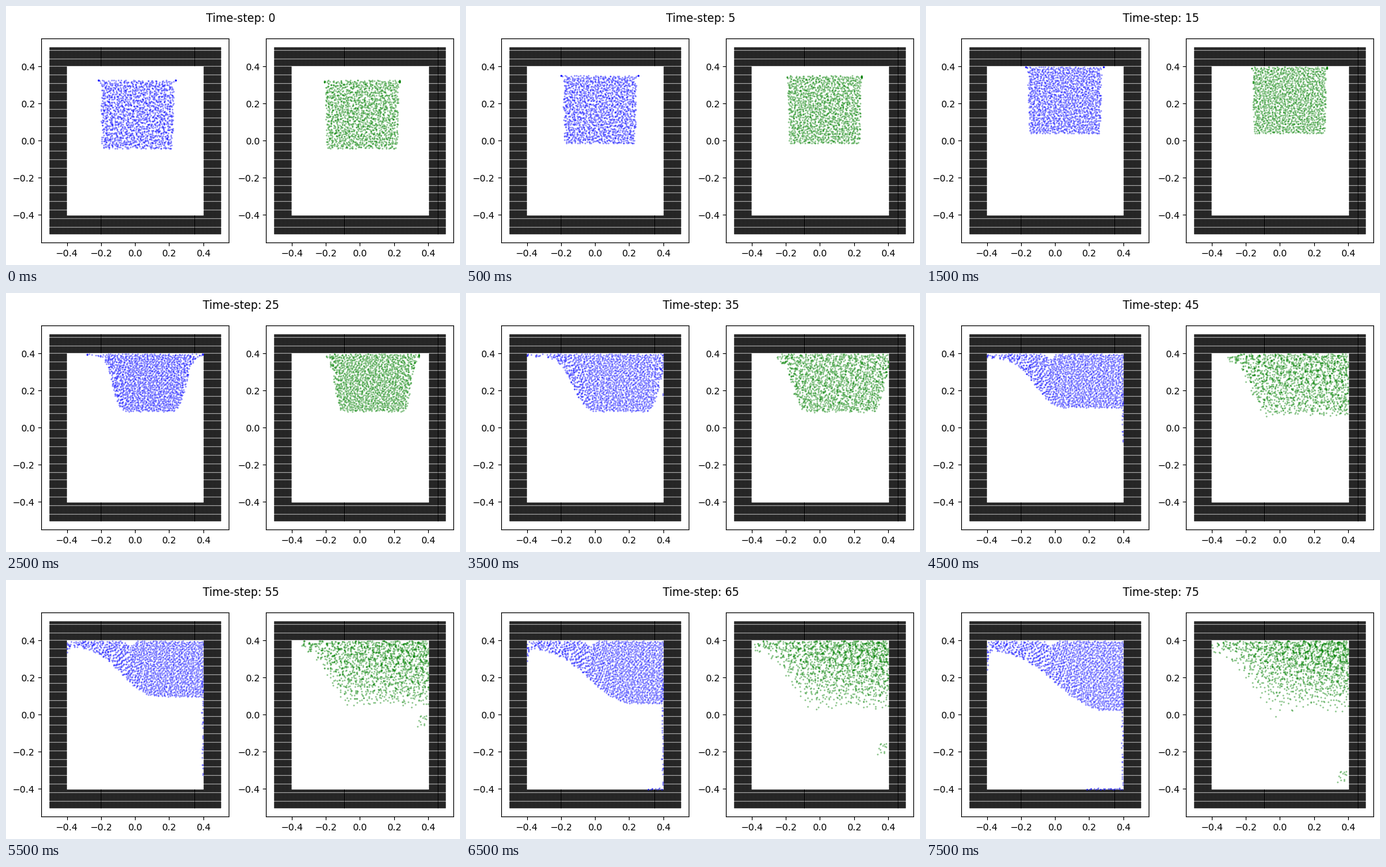
Write a matplotlib script that moves like this. It is 683x391 px and loops after 8 s.

```python
import numpy as np
import matplotlib.pyplot as plt
from matplotlib.animation import FuncAnimation

W, H = 683, 391
STEP, FRAMES = 5, 16
N = 1700

plt.rcParams["font.family"] = "DejaVu Sans"
rng = np.random.default_rng(4)


def since(t, start):
    return max(t - start, 0)


def rise(z):
    return 1 / (1 + np.exp(-np.clip(z, -40, 40)))


class Fluid:
    """A block that drifts up and right, then spreads below the ceiling."""

    def __init__(self, spread, reach, film, jitter):
        self.spread, self.reach, self.film = spread, reach, film
        i = np.arange(1, N + 1)
        self.grid = np.stack([i * .7548776662 % 1, i * .5698402910 % 1])
        self.noise = jitter * rng.normal(size=(2, N))

    def fill(self, t, left, bottom, lift=1, lean=0, dent=0, hang=0):
        soft = .002 + self.spread * since(t, 15)
        soft_r = min(soft, .022)
        right = .224 + .003 * t + .012 * since(t, 31)
        x = np.linspace(max(left - self.reach * soft, -.4),
                        min(right + self.reach * soft_r, .4), 800)
        ceiling = min(.325 + .005 * t, .398)
        top = ceiling - dent * np.exp(-((x + .03) / .025) ** 2)
        depth = (ceiling - bottom) * rise((x - left) / soft) * rise((right - x) / soft_r)
        depth += self.film * since(t, 15) + hang * np.exp(-(x + .4) / .008)
        low = np.minimum(np.maximum(ceiling - depth, bottom), top)

        # Columns take particles in proportion to their height
        u, v = np.clip(self.grid + self.noise * (.3 + .7 * np.exp(-t / 15)), 0, 1)
        share = np.cumsum((top - low + 1e-5) * (1 + lean * x))
        px = np.interp(u, share / share[-1], x)
        a, b = np.interp(px, x, low), np.interp(px, x, top)
        return px, a + v ** lift * (b - a)


def keep_inside(x, y):
    return np.clip(x, -.398, .399), np.clip(y, -.402, .398)


blue_fluid = Fluid(spread=.0019, reach=7, film=.0006, jitter=.012)
green_fluid = Fluid(spread=.0012, reach=3.5, film=.001, jitter=.014)

# Thin stream that runs down the right wall, then along the floor
release = np.linspace(34.4, 80, 70) + rng.normal(0, .5, 70)
stream_x, stream_y = rng.normal(0, .003, (2, 70))
# Loose drops that fall near the right wall
drop_x = rng.uniform(.335, .398, 13)
drop_y = rng.uniform(-.035, .04, 13)


def hover(t):
    """Lower edge of the block until it comes to rest under the ceiling."""
    return -.042 + .0054 * min(t, 24)


def blue_points(t):
    left = -.2 + .0028 * min(t, 23) + .004 * since(t, 42)
    bottom = hover(t) + .002 * np.clip(t - 35, 0, 10) - .0036 * since(t, 52)
    x, y = blue_fluid.fill(t, left, bottom, dent=.03 * rise((t - 41) / 1.5),
                           hang=.0045 * since(t, 45))
    out = release < t
    path = .025 * (t - release[out])
    over = np.maximum(path - .6, 0)
    sx = .396 - .5 * over + stream_x[out]
    sy = np.maximum(.2 - path, -.402 + np.abs(stream_y[out]))
    return keep_inside(np.append(x, sx), np.append(y, sy))


def green_points(t):
    left = -.2 + .0028 * min(t, 20) - .001 * np.clip(t - 20, 0, 30)
    bottom = hover(t) - .0022 * since(t, 36)
    late = since(t, 35)
    x, y = green_fluid.fill(t, left, bottom, lift=1 / (1 + .03 * late), lean=.035 * late)
    # Swirls pull the particles into clumps
    a = .008 * rise((t - 32) / 5)
    x, y = (x + a * np.sin(90 * y + 37 * x) + .6 * a * np.sin(150 * x - 60 * y),
            y + a * np.sin(83 * x - 41 * y) + .6 * a * np.sin(140 * y + 70 * x))
    if t > 35:
        x = np.append(x, drop_x)
        y = np.append(y, .12 - .015 * (t - 45) + drop_y)
    return keep_inside(x, y)


def wall():
    g = np.linspace(-.5, .5, 130)
    x, y = np.meshgrid(g, g)
    edge = np.maximum(abs(x), abs(y)) > .4
    return x[edge], y[edge]


fig = plt.figure(figsize=(W / 100, H / 100), dpi=100, facecolor="white")
title = fig.text(353.2 / W, 1 - 24 / H, "", fontsize=12, ha="center", va="baseline")


def panel(left, color):
    ax = fig.add_axes([left / W, 1 - 357.288 / H, 281.8 / W, 308 / H])
    ax.set(xlim=(-.55, .55), ylim=(-.55, .55))
    ticks = [-.4, -.2, 0, .2, .4]
    ax.set_xticks(ticks)
    ax.set_yticks(ticks)
    ax.plot(*wall(), "+", color="black", ms=1)
    return ax.plot([], [], "+", color=color, ms=1, alpha=.5)[0]


blue = panel(53.23, "blue")
green = panel(391.43, "green")


def draw(i):
    t = i * STEP
    title.set_text(f"Time-step: {t}")
    blue.set_data(*blue_points(t))
    green.set_data(*green_points(t))
    return title, blue, green


anim = FuncAnimation(fig, draw, frames=FRAMES, interval=500, repeat=True,
                     repeat_delay=0, blit=False)
plt.show()
```
